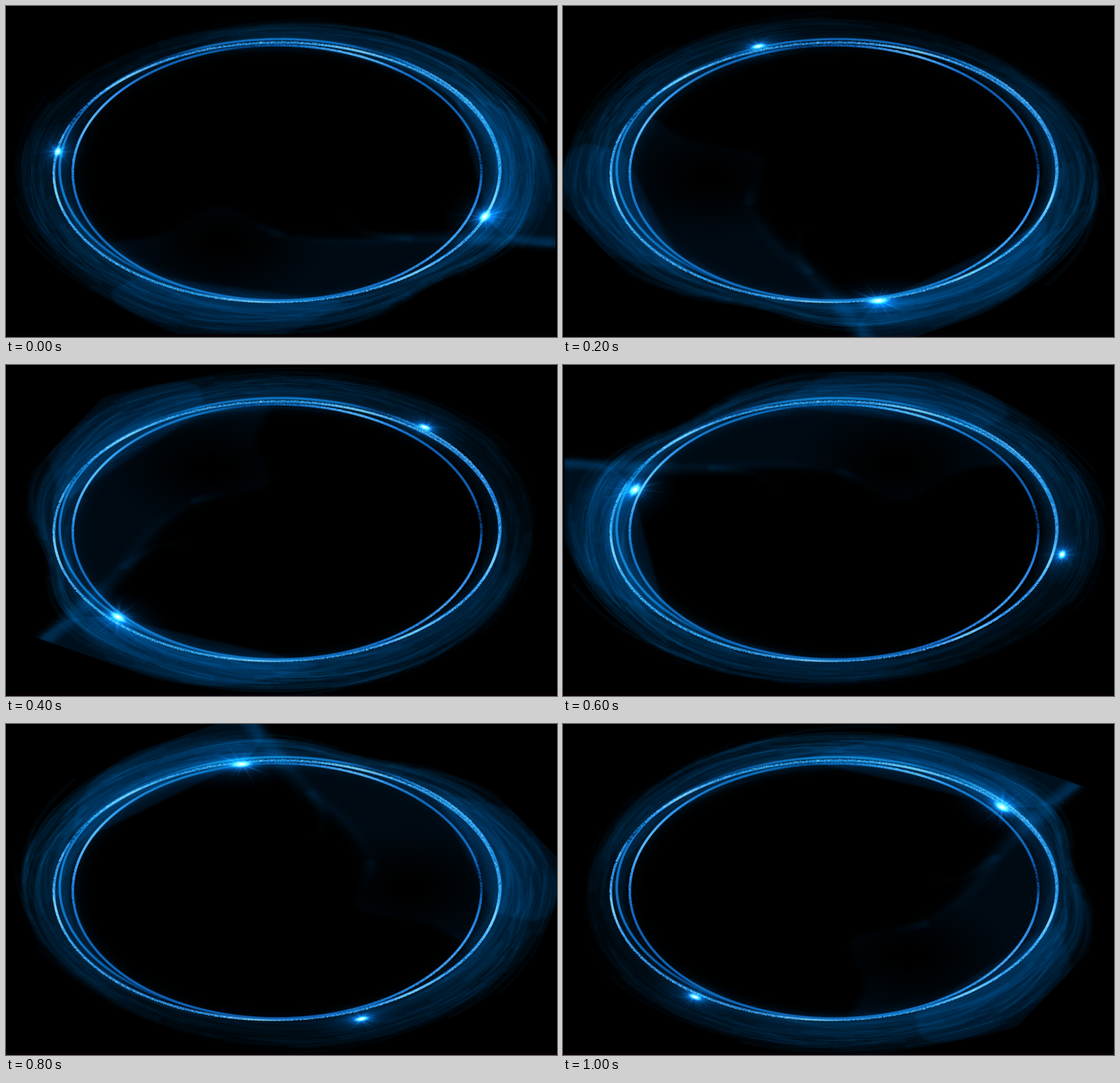
An HTML page with a canvas that plays this animation: 800x480 px, repeating every 1200 ms.

```html
<!DOCTYPE html>
<html lang="en">
<head>
<meta charset="utf-8">
<title>Glowing ring</title>
<style>
  html, body { margin: 0; width: 100%; height: 100%; overflow: hidden; background: #000; }
  #stage { position: relative; width: 800px; height: 480px; overflow: hidden; background: #000; }
  #tilt { position: absolute; left: 400px; top: 243px; width: 0; height: 0; transform: scaleY(.6); }
  #glow { position: absolute; left: -398px; top: -388px; animation: spin 1200ms steps(6, end) infinite; }
  #rings { position: absolute; left: 0; top: 0; mix-blend-mode: screen; }
  @keyframes spin { from { transform: rotate(0deg); } to { transform: rotate(360deg); } }
</style>
</head>
<body>
<div id="stage">
  <div id="tilt"><canvas id="glow" width="796" height="776"></canvas></div>
  <canvas id="rings" width="800" height="480"></canvas>
</div>
<script>
const RAD = Math.PI / 180;
const EDGE = 320;

let seed = 7;
function rand() {
  seed = (seed * 16807) % 2147483647;
  return seed / 2147483647;
}

// Soft peak of height 1 around an angle, in degrees.
function bump(deg, at, width) {
  const d = ((deg - at) % 360 + 540) % 360 - 180;
  return Math.exp(-((d / width) ** 2));
}

// The haze is weakest at the upper left and thin below the large flare.
const power = deg => .86 - .6 * bump(deg, 228, 48) - .26 * bump(deg, 50, 24);
const reach = deg => 390 - 22 * bump(deg, 255, 40) - 40 * bump(deg, 50, 18) + 16 * bump(deg, 112, 18);

function paintHalo(g) {
  const { width: w, height: h } = g.canvas;
  const img = g.createImageData(w, h);
  for (let y = 0, p = 0; y < h; y++) {
    for (let x = 0; x < w; x++, p += 4) {
      const dx = x - w / 2, dy = y - h / 2, r = Math.hypot(dx, dy);
      let v = 0;
      if (r > 240 && r < 420) {
        const deg = Math.atan2(dy, dx) / RAD;
        const u = (r - EDGE) / (reach(deg) - EDGE);
        const fall = u > 0 ? Math.max(0, 1 - u) : Math.exp(-(((EDGE - r) / 20) ** 2));
        v = power(deg) * fall;
      }
      img.data[p + 1] = 42 * v;
      img.data[p + 2] = 75 * v;
      img.data[p + 3] = 255;
    }
  }
  g.putImageData(img, 0, 0);
}

function paintStrands(g) {
  for (let n = 0; n < 360; n++) {
    const start = rand() * 360, span = 16 + rand() * 44;
    const from = rand() * .95, to = from + (rand() - .5) * .8;
    g.beginPath();
    for (let i = 0; i <= 16; i++) {
      const k = i / 16, deg = start + span * k;
      const r = EDGE - 4 + (reach(deg) - EDGE) * (from + (to - from) * k);
      g.lineTo(r * Math.cos(deg * RAD), r * Math.sin(deg * RAD));
    }
    g.lineWidth = .8 + 9 * rand() ** 2;
    g.strokeStyle = `rgba(0,85,150,${.08 * power(start + span / 2)})`;
    g.stroke();
  }
}

function smooth(g, pts) {
  g.beginPath();
  g.moveTo(...pts[0]);
  for (let i = 1; i < pts.length - 1; i++) {
    const [x, y] = pts[i], [nx, ny] = pts[i + 1];
    g.quadraticCurveTo(x, y, (x + nx) / 2, (y + ny) / 2);
  }
  g.lineTo(...pts[pts.length - 1]);
}

function wisp(g, pts, width, color) {
  const fade = g.createLinearGradient(...pts[0], ...pts[pts.length - 1]);
  fade.addColorStop(0, color);
  fade.addColorStop(1, 'rgba(0,0,0,0)');
  smooth(g, pts);
  g.lineWidth = width;
  g.strokeStyle = fade;
  g.stroke();
}

function patch(g, pts, color) {
  smooth(g, pts);
  g.fillStyle = color;
  g.fill();
}

// Flat sheets that run off the square, the fill inside the ring and its folds.
function paintVeil(g) {
  g.save();
  g.filter = 'blur(2px)';
  patch(g, [[250, -205], [345, -150], [400, -40], [420, 178], [398, 178], [330, 166], [300, 110]], 'rgb(0,15,28)');
  patch(g, [[90, 310], [40, 370], [-43, 410], [-131, 410], [-270, 295], [-200, 245]], 'rgb(0,11,21)');

  const fill = g.createRadialGradient(-84, 165, 25, -84, 165, 150);
  fill.addColorStop(0, '#000');
  fill.addColorStop(1, 'rgb(0,10,19)');
  g.filter = 'blur(4px)';
  smooth(g, [[300, 155], [200, 154], [110, 160], [30, 154], [-40, 128], [-76, 72], [-110, 80], [-170, 150], [-250, 165]]);
  g.arc(0, 0, 312, 147 * RAD, 29 * RAD, true);
  g.fillStyle = fill;
  g.fill();

  g.filter = 'blur(6px)';
  wisp(g, [[400, 168], [300, 160], [206, 150], [120, 162], [40, 156], [-40, 125], [-75, 80]], 24, 'rgba(0,75,130,.42)');
  g.filter = 'blur(3px)';
  wisp(g, [[190, 156], [125, 150], [95, 115], [76, 72]], 14, 'rgba(0,60,105,.26)');
  wisp(g, [[0, 150], [-50, 112], [-80, 62]], 16, 'rgba(0,40,72,.26)');
  g.restore();
}

function spot(g, rx, ry, stops) {
  const light = g.createRadialGradient(0, 0, 0, 0, 0, 1);
  stops.forEach((color, i) => light.addColorStop(i / (stops.length - 1), color));
  g.save();
  g.scale(rx, ry);
  g.fillStyle = light;
  g.fillRect(-1, -1, 2, 2);
  g.restore();
}

function flare(g, deg, r, size) {
  g.save();
  g.rotate(deg * RAD);
  g.translate(r, 0);
  g.scale(size, size);
  spot(g, 62, 100, ['rgba(0,90,170,.5)', 'rgba(0,65,125,.17)', 'rgba(0,40,80,0)']);
  spot(g, 20, 34, ['rgba(60,160,245,.6)', 'rgba(15,100,200,.28)', 'rgba(0,70,150,0)']);
  for (let i = 0; i < 12; i++) {
    g.save();
    g.rotate((i + rand()) * Math.PI / 12);
    spot(g, 22 + rand() * 38, 1.5 + rand() * 2, ['rgba(70,160,240,.28)', 'rgba(0,80,170,0)']);
    g.restore();
  }
  spot(g, 8, 19, ['#fff', 'rgba(150,215,255,.5)', 'rgba(40,140,240,0)']);
  g.restore();
}

const glow = document.getElementById('glow').getContext('2d');
paintHalo(glow);
glow.translate(398, 388);
glow.globalCompositeOperation = 'lighter';
paintStrands(glow);
paintVeil(glow);
flare(glow, 19.3, 313, 1);
flare(glow, 189.3, 329, .72);

// level and grain give the brightness and its speckle at an angle.
const RINGS = [
  { cx: 398, cy: 237, rx: 320, ry: 189, turn: 0,
    level: d => .4 - .32 * bump(d, 95, 42) - .22 * bump(d, 236, 13) - .2 * bump(d, 297, 8) + .3 * bump(d, 325, 16),
    grain: d => .7 * bump(d, 325, 22) + .5 * bump(d, 35, 18) },
  { cx: 393, cy: 241, rx: 323.5, ry: 188, turn: -.6,
    level: d => .58 + [14, 52, 95, 172, 228, 292].reduce((sum, at) => sum + .32 * bump(d, at, 9), -.3 * bump(d, 207, 6)),
    grain: d => .85 - [14, 52, 95, 172, 228, 292].reduce((sum, at) => sum + .6 * bump(d, at, 9), 0) },
  { cx: 393.5, cy: 242, rx: 296.5, ry: 185, turn: 0,
    level: d => .38 + .3 * bump(d, 32, 24) + .42 * bump(d, 203, 20) + .4 * bump(d, 293, 12) - .2 * bump(d, 356, 8) - .14 * bump(d, 262, 10),
    grain: d => .5 * (bump(d, 40, 28) + bump(d, 184, 12) + bump(d, 285, 22) + bump(d, 356, 8)) }
];

function tone(level) {
  const l = Math.max(0, Math.min(1, level));
  const dim = Math.min(1, l * 3.3);
  return `${150 * l ** 2.2},${(20 + 205 * l) * dim},${(75 + 180 * Math.min(1, l * 1.6)) * dim}`;
}

function paintRing(g, { cx, cy, rx, ry, turn, level, grain }) {
  g.save();
  g.translate(cx, cy);
  g.rotate(turn * RAD);
  for (let deg = 0; deg < 360; deg += .2) {
    const c = Math.cos(deg * RAD), s = Math.sin(deg * RAD);
    const len = Math.hypot(c / rx, s / ry);
    const nx = c / rx / len, ny = s / ry / len;
    for (let lane = -1; lane <= 1; lane++) {
      const jitter = (rand() - .5) * grain(deg);
      const d = lane * 1.05 + jitter;
      g.fillStyle = `rgba(${tone(level(deg) + jitter * .8)},${lane ? .72 : .95})`;
      g.fillRect(rx * c + nx * d - .7, ry * s + ny * d - .7, 1.4, 1.4);
    }
  }
  g.restore();
}

const rings = document.getElementById('rings').getContext('2d');
rings.fillStyle = '#000';
rings.fillRect(0, 0, 800, 480);
RINGS.forEach(ring => paintRing(rings, ring));
rings.fillStyle = '#080006';
rings.fillRect(0, 477, 800, 3);
</script>
</body>
</html>
```
